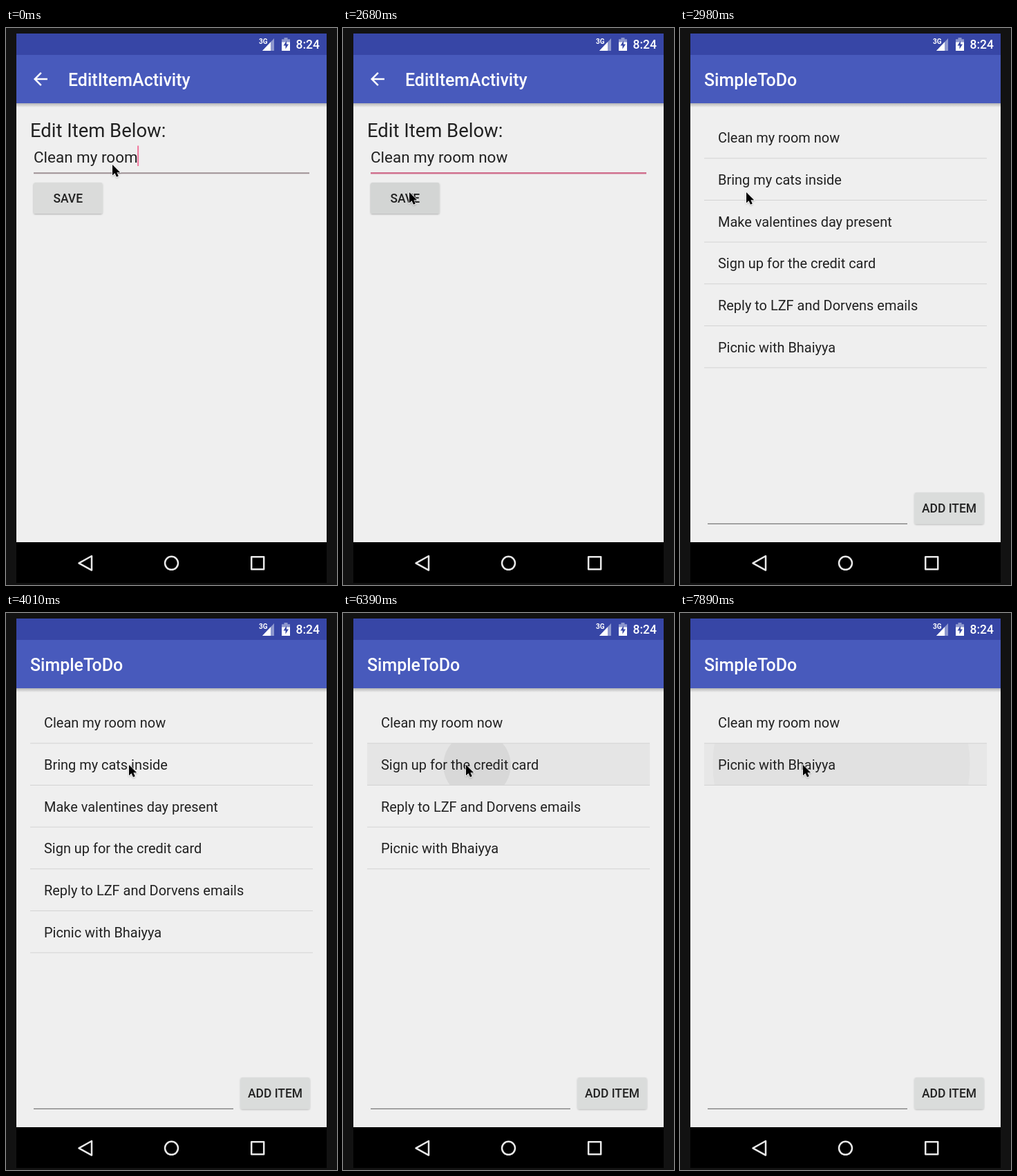
Write an HTML page that moves like this. It is 479 by 807 pixels and loops after 8000 ms.

```html
<!DOCTYPE html>
<html lang="en">
<head>
<meta charset="utf-8">
<title>To-do list</title>
<style>
  html, body { margin: 0; width: 100%; height: 100%; overflow: hidden; background: #121212; }
  svg { display: block; width: 479px; height: 807px; }
  text { font-family: Roboto, sans-serif; fill: #212121; white-space: pre; }
  .title { font-size: 24.94px; font-weight: 500; fill: #fff; }
  .button { font-size: 17.46px; font-weight: 500; text-anchor: middle; }
  .row { font-size: 19.95px; }
  .line { stroke: #d3d3d3; }
</style>
</head>
<body>
<svg viewBox="0 0 479 807">
  <defs>
    <linearGradient id="fade" x2="0" y2="1">
      <stop stop-color="#000" stop-opacity=".24"/>
      <stop offset="1" stop-color="#000" stop-opacity="0"/>
    </linearGradient>
    <filter id="drop" x="-20%" y="-20%" width="140%" height="150%">
      <feDropShadow dx="0" dy="1" stdDeviation=".8" flood-opacity=".28"/>
    </filter>
    <clipPath id="rowClip"><rect x="35" y="188.5" width="409" height="61"/></clipPath>
    <g id="page">
      <rect x="15" y="39" width="449" height="706" fill="#efefef"/>
      <rect x="15" y="109" width="449" height="6" fill="url(#fade)"/>
      <rect x="15" y="39" width="449" height="70" fill="#485abc"/>
    </g>
  </defs>

  <rect width="479" height="807" fill="#121212"/>

  <g id="listPage">
    <use href="#page"/>
    <text class="title" x="35" y="84">SimpleToDo</text>
    <g clip-path="url(#rowClip)">
      <rect id="glow" x="35" y="188.5" width="409" height="61"/>
      <circle id="ripple"/>
    </g>
    <g id="rows"></g>
    <path d="M40 718.3H329" stroke="#777" stroke-width="1.2"/>
    <rect x="339.5" y="673" width="100" height="45.5" rx="2.5" fill="#dadcdb" filter="url(#drop)"/>
    <text class="button" x="389.5" y="702">ADD ITEM</text>
  </g>

  <g id="editPage">
    <use href="#page"/>
    <path transform="translate(35 59) scale(1.247)" fill="#fff"
      d="M20 11H7.83l5.59-5.59L12 4l-8 8 8 8 1.41-1.41L7.83 13H20z"/>
    <text class="title" x="90" y="84">EditItemActivity</text>
    <text x="35" y="158" font-size="27.44">Edit Item Below:</text>
    <text id="input" x="40" y="194.5" font-size="22.45"></text>
    <rect id="caret" y="170.5" width="2" height="29.5" fill="#f2749b"/>
    <path id="underline" d="M40 210.3H439"/>
    <rect id="save" x="40" y="224" width="99.5" height="45" rx="2.5" filter="url(#drop)"/>
    <text class="button" x="89.7" y="253">SAVE</text>
  </g>

  <rect x="15" y="8" width="449" height="31" fill="#3746a6"/>
  <text x="366" y="23" font-size="10" font-weight="700" style="fill:#fff">3G</text>
  <path d="M371 33H388V15z" fill="#8d97cd"/>
  <path d="M371 33H383V20.3z" fill="#fff"/>
  <path d="M399 21V16.3H402.5V14H407.500V16.3H411V21z" fill="#8d97cd"/>
  <path d="M399 20.5H411V33H399z" fill="#fff"/>
  <path d="M406 18.500L401.500 25.500H404.500V30.500L409 23.500H406z" fill="#3746a6"/>
  <text x="419.500" y="30.300" font-size="17.46" font-weight="500" style="fill:#fff">8:24</text>

  <rect x="15" y="745" width="449" height="59"/>
  <g fill="none" stroke="#e8e8e8" stroke-width="2.5" stroke-linejoin="round">
    <path d="M105.500 775.300L124 765V785.600z"/>
    <circle cx="239.500" cy="775.300" r="9.500"/>
    <rect x="355.200" y="766.300" width="18" height="18"/>
  </g>

  <path id="mouse" d="M0 0V15.500L3.500 12.200 6 17.800 8.800 16.600 6.400 11.200H11.200z"
    stroke="#fff" stroke-width="1.300" paint-order="stroke" filter="url(#drop)"/>
</svg>

<script>
const LOOP = 8000, STEP = LOOP / 54;
const HOLD = 430;
const presses = [3990, 4970, 6076, 7270];
const items = ["Clean my room now", "Bring my cats inside", "Make valentines day present",
  "Sign up for the credit card", "Reply to LZF and Dorvens emails", "Picnic with Bhaiyya"];
const typed = [[0, ""], [1300, " "], [1600, " no"], [1750, " now"]];
const mousePath = [[0, 154, 198], [440, 206, 256], [885, 219, 203], [1930, 219, 203],
  [2365, 96, 238], [2965, 96, 238], [3550, 178, 220]];

const $ = id => document.getElementById(id);
const clamp = v => Math.max(0, Math.min(1, v));
const mix = (a, b, u) => a + (b - a) * u;
const set = (el, attrs) => { for (const k in attrs) el.setAttribute(k, attrs[k]); };

function mouseAt(t) {
  const i = mousePath.findLastIndex(k => k[0] <= t);
  const a = mousePath[i], b = mousePath[i + 1] || a;
  const u = clamp((t - a[0]) / (b[0] - a[0] || 1)), e = u * u * (3 - 2 * u);
  return [mix(a[1], b[1], e), mix(a[2], b[2], e)];
}

function drawEdit(t) {
  const leave = t - 2667;
  const visible = leave < 250;
  $("editPage").style.display = visible ? "" : "none";
  if (!visible) return;
  set($("editPage"), {
    transform: `translate(0 ${56 * clamp(leave / 250) ** 2})`,
    opacity: 1 - clamp((leave - 100) / 150)
  });
  const input = $("input");
  input.textContent = "Clean my room" + typed.findLast(k => k[0] <= t)[1];
  const caretOff = (t > 350 && t < 850) || t > 2290;
  set($("caret"), { x: 39.5 + input.getComputedTextLength(), opacity: caretOff ? 0 : 1 });
  const focus = clamp(t / 500);
  set($("underline"), {
    stroke: `rgb(${mix(158, 208, focus)},${mix(145, 112, focus)},${mix(149, 142, focus)})`,
    "stroke-width": mix(2, 2.6, focus)
  });
  set($("save"), { fill: t > 2600 ? "#d3d5d4" : "#dadbda" });
}

function drawList(t) {
  const removed = presses.filter(p => t >= p + HOLD).length;
  const shown = [items[0], ...items.slice(1 + removed)];
  $("rows").innerHTML = shown.map((item, i) => {
    const y = 60.66 * i;
    return `<text class="row" x="55" y="${166.2 + y}">${item}</text>
      <path class="line" d="M35 ${188.8 + y}H444"/>`;
  }).join("");

  // The ripple creeps while held, then spreads and fades on release.
  const held = t - (presses.findLast(p => p <= t) ?? Infinity);
  const after = Math.max(0, held - HOLD);
  const creep = 0.0008 * Math.max(0, Math.min(held, HOLD));
  const grow = mix(creep, 1, 1 - (1 - clamp(after / 250)) ** 2);
  set($("ripple"), {
    cx: mix(180, 239.5, grow), cy: mix(221, 219, grow), r: 207 * grow,
    opacity: 0.056 * (1 - clamp(after / 300))
  });
  set($("glow"), { opacity: 0.055 * clamp(held / 370) * (1 - clamp(after / 450)) });
}

function frame(now) {
  const t = Math.floor((now % LOOP + 3) / STEP) * STEP;
  drawList(t);
  drawEdit(t);
  set($("mouse"), { transform: `translate(${mouseAt(t)})` });
  requestAnimationFrame(frame);
}
frame(0);
</script>
</body>
</html>
```
